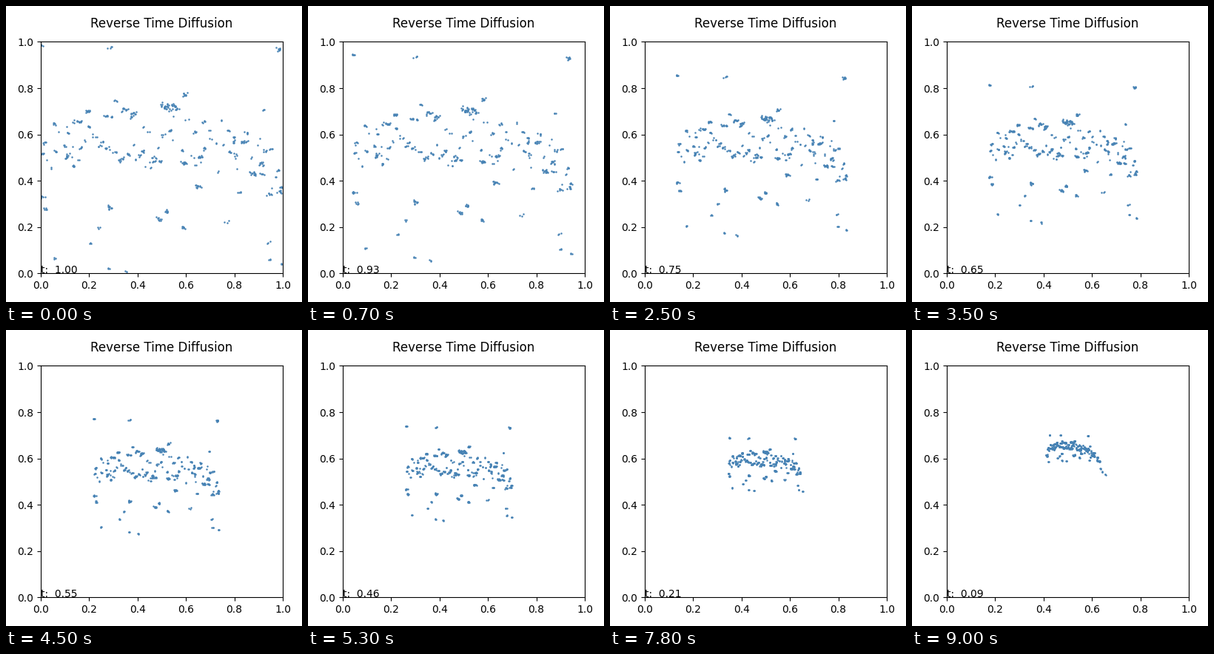
Write a matplotlib script that moves like this. It is 400 px wide and 400 px high and loops after 10 s.

```python
import matplotlib.pyplot as plt
import numpy as np
from matplotlib.animation import FuncAnimation

FRAMES = 100
LAST = 90  # the cloud rests after this step

# Main cluster centres at t = 1, heaviest first
CENTRES = [
    (.52, .72), (.65, .375), (.115, .505), (.59, .475), (.28, .283),
    (.55, .725), (.655, .503), (.16, .655), (.91, .475), (.595, .77),
    (.98, .97), (.19, .70), (.345, .71), (.38, .69), (.49, .235),
    (.52, .268), (.59, .198), (.87, .433), (.005, .33), (.99, .355),
    (.945, .345), (.465, .485), (.425, .525), (.275, .54), (.14, .465),
    (.06, .65), (.02, .28), (0, .985), (.285, .975), (.31, .745),
    (.80, .59), (.82, .35), (.92, .705), (.94, .13), (.945, .06),
    (.995, .04), (.06, .065), (.28, .025), (.35, .01), (.205, .13),
    (.24, .198), (.77, .223),
]

# Box around the cloud over time
STEPS = [0, 15, 25, 45, 61, 78, 90]
LEFT = [0, .089, .132, .219, .302, .342, .405]
RIGHT = [1, .889, .836, .738, .665, .655, .660]
LOW = [0, .107, .160, .271, .387, .457, .572]
TOP = [1, .910, .866, .779, .712, .693, .703]
BEND = [0, 0, 0, 0, .12, .4, 1]


def make_cloud():
    rng = np.random.default_rng(4)
    parts = []

    def cluster(centre, n):
        spread = (.003 + .0004 * n, .002 + .0003 * n)
        parts.append(rng.normal(centre, spread, (n, 2)))

    for k, centre in enumerate(CENTRES):
        cluster(centre, 24 if k == 0 else max(3, 11 - k // 4))
    # smaller clusters and single dots fill an arched band
    for k in range(80):
        x = (k + rng.uniform()) / 80
        high = .74 - .6 * (x - .4) ** 2
        low = .45 - .3 * max(x - .6, 0)
        cluster((x, rng.uniform(low, high)), rng.choice([1, 2, 4, 5]))
    return np.clip(np.vstack(parts), 0, 1)


def positions(step):
    left, right, low, top, bend = (
        np.interp(step, STEPS, v) for v in (LEFT, RIGHT, LOW, TOP, BEND))
    u, v = CLOUD.T
    left = left + .02 * bend * v
    right = right - .075 * bend * v
    low = low + bend ** 2 * (.1 * u - .15 * u ** 2)
    return np.column_stack([left + (right - left) * u,
                            low + (top - low) * v])


CLOUD = make_cloud()

fig, ax = plt.subplots(figsize=(4, 4), dpi=100)
ax.set(xlim=(0, 1), ylim=(0, 1))
ax.set_title("Reverse Time Diffusion", pad=14)
fig.tight_layout()
dots = ax.scatter(*CLOUD.T, s=3.2, color="steelblue", linewidths=0)
label = ax.text(0, 0, "")


def draw(i):
    step = min(i, LAST)
    dots.set_offsets(positions(step))
    label.set_text(f"t:  {1 - step / 99:.2f}")
    return dots, label


anim = FuncAnimation(fig, draw, frames=FRAMES, interval=100, repeat=True)
plt.show()
```
